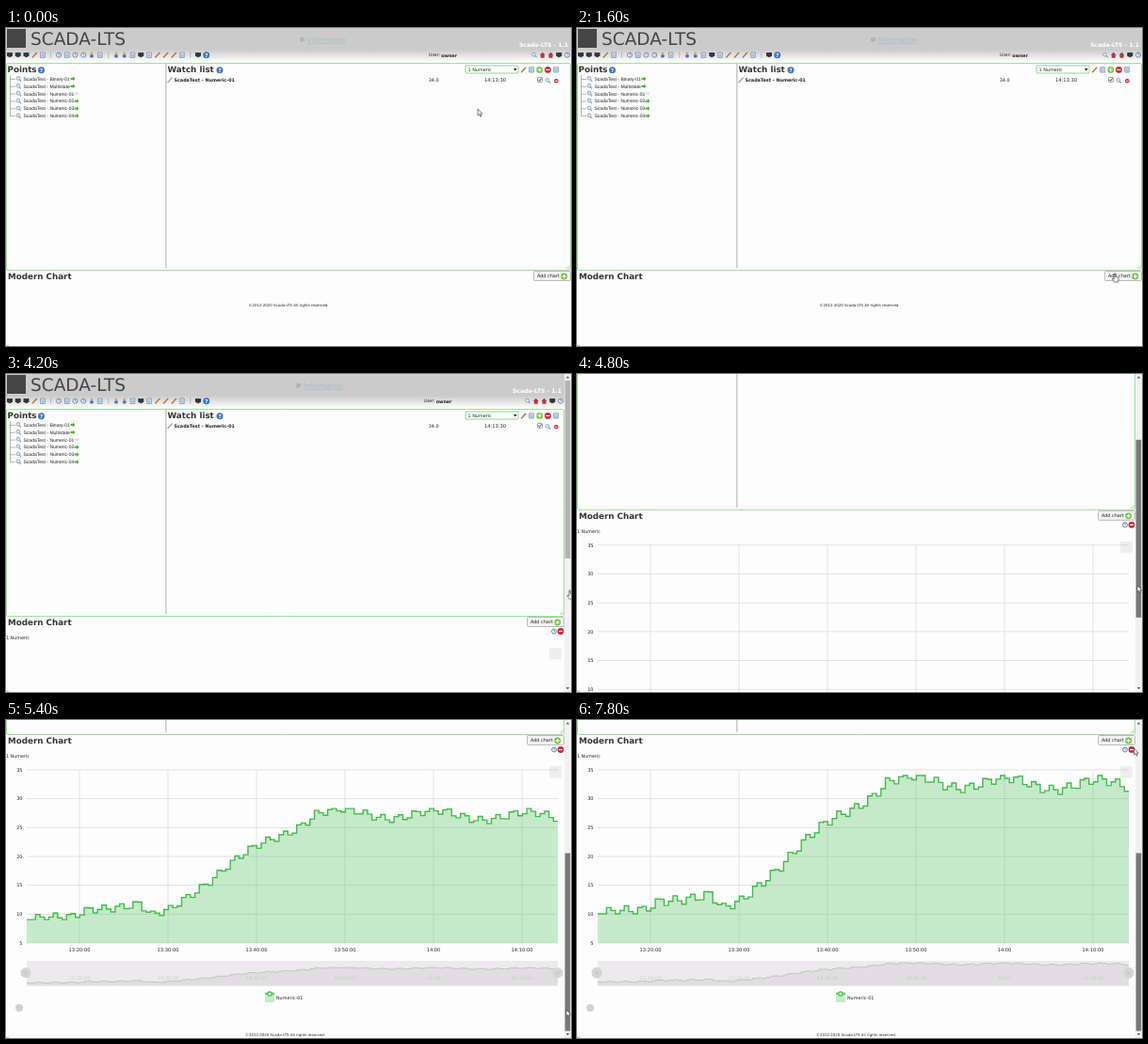
Recreate the animation shown at these times as an HTML page with a canvas. Size 600 by 338 pixels, loop 8 s.

```html
<!DOCTYPE html>
<html lang="en">
<head>
<meta charset="utf-8">
<title>Watch list and chart</title>
<style>
  html, body { margin: 0; width: 100%; height: 100%; overflow: hidden; background: #fff; }
  canvas { display: block; width: 600px; height: 338px; }
</style>
</head>
<body>
<canvas id="stage"></canvas>
<script>
const LOOP = 8000, STEP = 200, PAGE_SCROLL = 242;
const canvas = document.getElementById('stage');
const ctx = canvas.getContext('2d');
const ratio = window.devicePixelRatio || 1;
canvas.width = 600 * ratio;
canvas.height = 338 * ratio;
ctx.textRendering = 'geometricPrecision';

const GREEN = '#42bd4c', BLUE = '#3f78b5', RED = '#d3202e', LIME = '#6cc832';

const clamp = (v, low = 0, high = 1) => Math.min(high, Math.max(low, v));
const easeOut = (k, power) => 1 - (1 - clamp(k)) ** power;
const wave = (v, period) => Math.cos(v / period * 2 * Math.PI);

// Linear path through [position, ...values] keys
function track(keys, t) {
  const i = keys.findIndex(k => k[0] > t), a = keys[i - 1], b = keys[i];
  const k = (t - a[0]) / (b[0] - a[0]);
  return a.slice(1).map((v, n) => v + (b[n + 1] - v) * k);
}

const pointerKeys = [
  [0, 501, 86], [1400, 570, 260], [2000, 571, 263], [2800, 595, 181], [3600, 595, 183], [4200, 598, 230],
  [4600, 595, 183], [5200, 595, 308], [6800, 595, 308], [7800, 591.5, 30], [LOOP, 591.5, 30]];

// Rising trend with a slow and a fast wobble, limited to the sensor's range
const trend = [[0, 33], [10, 34], [14, 45], [25, 51], [28, 36], [32, 44], [45, 102], [65, 172], [120, 167]];
const heights = Array.from({ length: 120 }, (_, i) => {
  const [h] = track(trend, i);
  return clamp(h + h / 28 * wave(i - 71, 21) + 5 * wave(i - 91, 3.7), 31, 178);
});

function rect(x, y, w, h, fill) {
  ctx.fillStyle = fill;
  ctx.fillRect(x, y, w, h);
}

function paint(fill, stroke, width) {
  if (fill) { ctx.fillStyle = fill; ctx.fill(); }
  if (stroke) { ctx.strokeStyle = stroke; ctx.lineWidth = width; ctx.stroke(); }
}

function box(x, y, w, h, r, fill, stroke, width = 1) {
  ctx.beginPath();
  ctx.roundRect(x, y, w, h, r);
  paint(fill, stroke, width);
}

function disc(x, y, r, fill, stroke, width) {
  box(x - r, y - r, 2 * r, 2 * r, r, fill, stroke, width);
}

function path(points, stroke, width = 1, fill) {
  ctx.beginPath();
  points.forEach(([x, y]) => ctx.lineTo(x, y));
  if (fill) ctx.closePath();
  paint(fill, stroke, width);
}

// y is the middle of the capitals
function text(str, x, y, size, { color = '#222', bold = false, align = 'left', font = '"DejaVu Sans", sans-serif' } = {}) {
  ctx.font = `${bold ? 'bold ' : ''}${size}px ${font}`;
  ctx.textAlign = align;
  ctx.fillStyle = color;
  ctx.fillText(str, x, y + size * 0.36);
}

const title = (str, x, y) => text(str, x, y, 8.75, { bold: true, color: '#333' });

const icons = {
  help(x, y) {
    disc(x, y, 3.5, BLUE);
    text('?', x, y, 5.5, { color: '#fff', bold: true, align: 'center' });
  },
  minus(x, y, c = RED, r = 3.4) {
    disc(x, y, r, c);
    rect(x - r * 0.6, y - r * 0.2, r * 1.2, r * 0.4, '#fff');
  },
  plus(x, y) {
    icons.minus(x, y, LIME);
    rect(x - 0.7, y - 2, 1.4, 4, '#fff');
  },
  screen(x, y, c = '#30373b') {
    rect(x - 3, y - 2.6, 6, 4, c);
    rect(x - 1.5, y + 1.4, 3, 1, c);
  },
  doc(x, y, c = '#7590ac') {
    box(x - 2.3, y - 2.7, 4.6, 5.4, 0, '#e3eaf1', c, 0.8);
    rect(x - 1.5, y - 1, 3, 0.7, c);
    rect(x - 1.5, y + 0.8, 3, 0.7, c);
  },
  clock(x, y, c = '#6f84a0') {
    disc(x, y, 2.5, '#eef1f5', c, 1);
    path([[x, y - 1.6], [x, y], [x + 1.3, y]], c, 0.7);
  },
  user(x, y, c = '#4a76ae') {
    disc(x, y - 1.8, 1.4, '#dca65d');
    box(x - 1.8, y - 0.4, 3.6, 3.2, 1, c);
  },
  pencil(x, y, c = '#a9793c') {
    path([[x - 2.4, y + 2.8], [x + 2.6, y - 2.6]], c, 1.4);
  },
  home(x, y) {
    path([[x - 3, y], [x, y - 3], [x + 3, y], [x + 2, y], [x + 2, y + 3], [x - 2, y + 3], [x - 2, y]], null, 1, '#ad3a44');
  },
  lens(x, y) {
    disc(x - 0.5, y - 0.6, 1.9, '#dcebf5', '#7f98aa', 0.8);
    path([[x + 0.9, y + 0.9], [x + 2.5, y + 2.5]], '#7f98aa', 1.1);
  },
  arrow(x, y, c = '#4fb82c') {
    path([[x - 2.5, y - 1], [x, y - 1], [x, y - 2.4], [x + 2.6, y], [x, y + 2.4], [x, y + 1], [x - 2.5, y + 1]], null, 1, c);
  }
};

function iconRow(x, kinds) {
  kinds.split(' ').forEach((kind, i) => icons[kind](x + i * 8.75, 28.7));
}

function drawHeader(t, w) {
  const shade = ctx.createLinearGradient(0, 23, 0, 36);
  shade.addColorStop(0, '#cbcbcb');
  shade.addColorStop(1, '#fdfdfd');
  rect(0, 0, w, 36, shade);
  rect(1, 1, 20, 20, '#454545');
  text('SCADA-LTS', 26, 11.5, 18.5, { color: '#454545' });

  // The link pulses every two seconds
  const left = w === 600 ? 312 : 308;
  ctx.globalAlpha = 0.25 + 0.75 * (0.5 + 0.5 * wave(t - 2900, 2000)) ** 2;
  box(left, 10, 5, 4, 0.5, '#7776a8');
  path([[left + 1, 14], [left + 1, 16], [left + 3, 14]], null, 1, '#7776a8');
  text('Information', left + 8, 12.5, 7.2, { color: '#5395a2' });
  rect(left + 8, 16, 41.5, 0.7, '#5395a2');
  ctx.globalAlpha = 1;
  text('Scada-LTS - 1.1', w - 3, 18, 6.1, { color: '#fff', bold: true, align: 'right' });

  iconRow(4, 'screen screen screen pencil doc');
  iconRow(56, 'clock doc clock clock user doc');
  iconRow(117, 'user user doc screen doc pencil pencil pencil doc');
  iconRow(204, 'screen help');
  iconRow(w - 39, 'lens home home screen clock');
  [47, 108.5, 195.5].forEach(x => rect(x, 25, 0.7, 7, '#aaa'));
  const userX = w === 600 ? 449 : 443.5;
  text('User:', userX, 28.8, 4.7);
  text('owner', userX + 13.2, 28.8, 4.8, { bold: true });
}

function drawLists(w) {
  box(0.5, 37.5, w - 1, 220, 1.5, null, '#8fdf90', 0.9);
  rect(169.5, 38, 0.8, 217, '#999');
  [3, 5].forEach(d => path([[w - d, 256], [w - 1.5, 257.5 - d]], '#999', 0.6));

  title('Points', 1.5, 44.3);
  icons.help(37.5, 44.7);
  rect(4, 50, 0.7, 43.5, '#999');
  ['Binary-01', 'Multistate', 'Numeric-01', 'Numeric-02', 'Numeric-03', 'Numeric-04'].forEach((name, i) => {
    const y = 54 + i * 7.88;
    rect(4, y, 6, 0.7, '#999');
    icons.lens(13.5, y);
    text('ScadaTest - ' + name, 18.5, y, 5.03, { font: '"Liberation Sans", Arial, sans-serif' });
    icons.arrow(i < 2 ? 71 : 75, y, i === 2 ? '#d5e9cf' : undefined);
  });

  title('Watch list', 171.5, 44.3);
  icons.help(227, 44.7);
  box(488, 40, 56, 8, 0.5, '#fff', '#79c877', 0.8);
  text('1 Numeric', 490.5, 44.1, 4.9);
  path([[539, 43], [542.5, 43], [540.75, 45.6]], null, 1, '#222');
  icons.pencil(549.5, 44.4);
  icons.doc(558, 44.4);
  icons.plus(566.7, 44.4);
  icons.minus(575.4, 44.4);
  icons.doc(584, 44.4);

  icons.pencil(174, 55.2, '#aaa');
  text('ScadaTest - Numeric-01', 178.5, 55.2, 4.85, { bold: true });
  text('34.0', 448.7, 55.2, 4.9);
  text('14:13:30', 508, 55.2, 5.15);
  box(564.5, 52.5, 5, 5, 0.8, '#fff', '#777', 0.7);
  path([[565.5, 55], [566.6, 56.3], [568.7, 53.4]], '#222', 0.9);
  icons.lens(575.5, 56);
  icons.minus(584.3, 56.3, RED, 2.3);
}

function stepArea(base, scale, stroke, width, fill) {
  const points = heights.flatMap((h, i) => [0, 1].map(end => [22 + (i + end) * 4.7, base - h * scale]));
  path([[22, base], ...points, [586, base]], null, 1, fill);
  path(points, stroke, width);
}

function timeLabels(y, color) {
  ['13:20:00', '13:30:00', '13:40:00', '13:50:00', '14:00', '14:10:00'].forEach((label, i) =>
    text(label, 78 + i * 94, y, 5.1, { align: 'center', color }));
}

function drawChart(grow) {
  const top = 295, base = 479;
  for (let i = 0; i < 7; i++) {
    const y = base - i * 30.67;
    rect(22, y - 0.4, 564, 0.8, '#dcdcdc');
    text(5 + 5 * i, 17.5, y, 5, { align: 'right' });
  }
  for (let i = 0; i < 6; i++) rect(77.6 + i * 94, top, 0.8, base - top, '#dcdcdc');
  timeLabels(486.2);
  stepArea(base, grow, GREEN, 1.4, 'rgba(66,190,76,0.3)');

  rect(22, 498, 564, 26, grow ? '#eceaec' : '#f8f7f8');
  if (grow) {
    timeLabels(516.5, '#cfcfcf');
    stepArea(525, 0.14 * grow, '#c4c4c4', 1, 'rgba(190,190,190,0.28)');
  }
  [21, 586].forEach(x => {
    const half = 3.5 + 2.5 * grow;
    box(x - 5.5, 510.7 - half, 11, 2 * half, half, '#d4d4d4');
    [-1, 1].forEach(side => rect(x + side - 0.35, 509.2, 0.7, 3, '#bbb'));
  });

  rect(275, 531, 10, 11, '#c5edc7');
  path([[275, 533], [285, 533]], GREEN, 1.3);
  disc(280, 533, 2.2, '#fff', GREEN, 1.2);
  text('Numeric-01', 287, 537, 4.85);
  disc(14, 548, 4, '#d2d2d2');
}

function drawChartSection(t, w) {
  title('Modern Chart', 2, 264);
  box(w - 39.5, 258.5, 39, 10, 1, '#f2f2f2', '#b5b5b5', 0.9);
  text('Add chart', w - 36, 263.5, 4.9);
  icons.plus(w - 7.3, 264);
  if (w < 600) {
    icons.clock(582, 273.5);
    icons.minus(589, 273.5);
    text('1 Numeric', 0, 280.5, 4.85);
    if (t >= 4600) drawChart(easeOut((t - 5200) / 600, 4));
    if (t >= 3400) {
      box(577, 291, 13, 12.5, 1.5, 'rgba(0,0,0,0.06)');
      text('...', 583.5, 296, 5, { color: '#d3d3d3', align: 'center' });
    }
  }
  text('©2012-2020 Scada-LTS All rights reserved.', w / 2, w < 600 ? 577 : 294.3, 3.95, { align: 'center' });
}

function drawScrollbar(t, scroll) {
  rect(593, 0, 7, 338, '#f1f1f1');
  path([[594.8, 4.5], [598.2, 4.5], [596.5, 2.3]], null, 1, '#555');
  path([[594.8, 333], [598.2, 333], [596.5, 335.2]], null, 1, '#555');
  rect(593.6, 7 + scroll / PAGE_SCROLL * 134.5, 5.6, 189, t >= 4600 ? '#787878' : '#b3b3b3');
}

function drawPointer(t, x, y) {
  const hand = t >= 1400 && t < 4600;
  const shape = hand
    ? [[0, 0], [1.2, 0], [1.5, 3.4], [4.4, 4.2], [4.8, 6], [3.9, 9.2], [0.4, 9.2], [-2, 5.8], [-1.4, 5], [0, 6]]
    : [[0, 0], [0, 7], [1.6, 5.5], [2.7, 8.2], [3.8, 7.7], [2.7, 5.2], [4.8, 5.2]];
  path(shape.map(([dx, dy]) => [x + dx, y + dy]), '#444', 0.7, '#fff');
}

function draw(t) {
  const w = t < 2600 ? 600 : 593;
  const scroll = PAGE_SCROLL * easeOut((t - 4600) / 740, 2);
  ctx.setTransform(ratio, 0, 0, ratio, 0, 0);
  rect(0, 0, 600, 338, '#fefdfe');
  ctx.save();
  ctx.translate(0, -scroll);
  drawHeader(t, w);
  drawLists(w);
  drawChartSection(t, w);
  ctx.restore();
  if (w < 600) drawScrollbar(t, scroll);
  rect(0, 336.8, 3, 0.8, '#aaa');
  drawPointer(t, ...track(pointerKeys, t));
}

function frame() {
  draw(Math.floor(performance.now() % LOOP / STEP) * STEP);
  requestAnimationFrame(frame);
}
frame();
</script>
</body>
</html>
```
